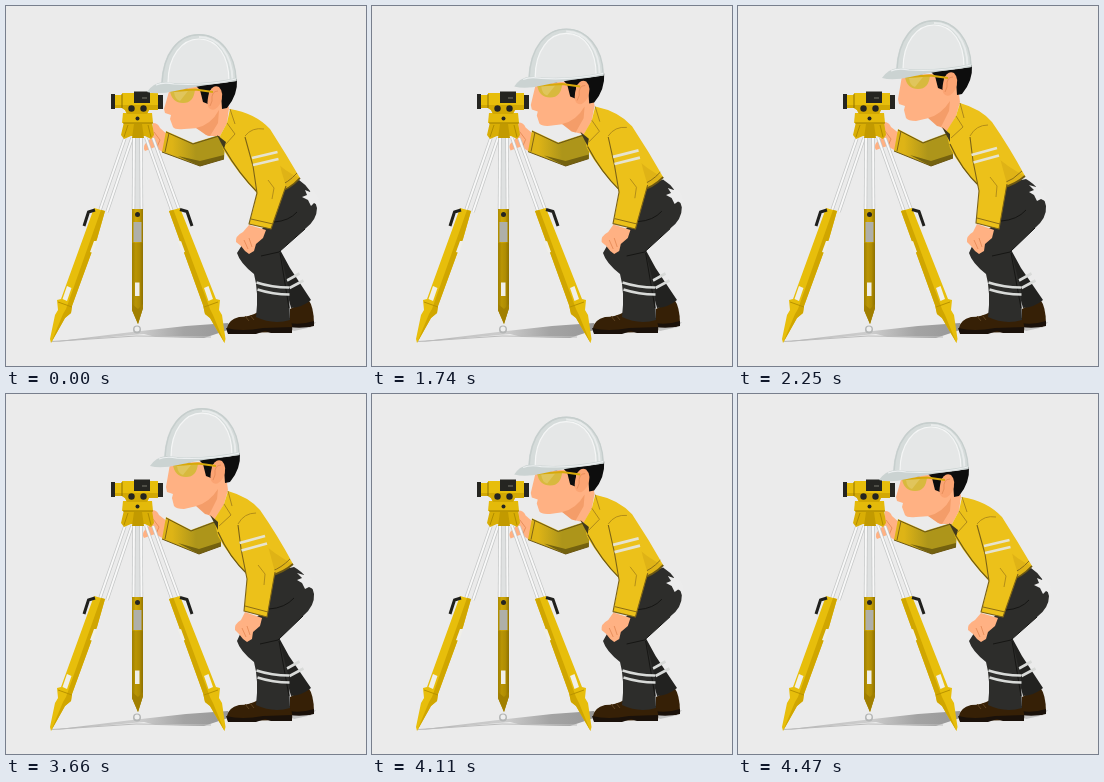
These frames come from a looping animation (360 by 360 pixels, 4500 ms). An HTML page with a canvas:

```html
<!DOCTYPE html>
<html lang="en">
<head>
<meta charset="utf-8">
<title>Surveyor</title>
<style>
html, body { margin: 0; width: 100%; height: 100%; overflow: hidden; background: #ebebeb; }
canvas { display: block; width: 360px; height: 360px; }
</style>
</head>
<body>
<canvas id="stage"></canvas>
<script>
const canvas = document.getElementById('stage');
const ctx = canvas.getContext('2d');
const scale = window.devicePixelRatio || 1;
canvas.width = canvas.height = 360 * scale;

const LOOP = 4500, STEP = 30;
const INK = '#252521', GOLD = '#e7be0b', DEEP = '#b99300', SHIRT = '#ecc11a', SEAM = '#6b5714';
const SKIN = '#ffb183', SKIN_DARK = '#e98f5c', PANTS = '#2d2d2b', SILVER = '#d8dad8';
let rise = 0;

// Blend two path strings that share the same commands.
function mix(low, high) {
  const ends = high.match(/-?\d+(\.\d+)?/g);
  let i = 0;
  return low.replace(/-?\d+(\.\d+)?/g, n => +n + (ends[i++] - n) * rise);
}

function fill(d, color) {
  ctx.fillStyle = color;
  ctx.fill(new Path2D(d));
}

function line(d, color, width = 1) {
  ctx.strokeStyle = color;
  ctx.lineWidth = width;
  ctx.stroke(new Path2D(d));
}

function dot(x, y, r, color) {
  ctx.fillStyle = color;
  ctx.beginPath();
  ctx.arc(x, y, r, 0, 2 * Math.PI);
  ctx.fill();
}

function fade(x0, x1, ...colors) {
  const g = ctx.createLinearGradient(x0, 0, x1, 0);
  colors.forEach((c, i) => g.addColorStop(i / (colors.length - 1), c));
  return g;
}

function pole(d) {
  line(d, '#c3c5c5', 3.4);
  line(d, '#f8f8f8', 2);
}

function drawShadow() {
  fill('M45 336 L126 326 L180 320 L222 317 L222 324 L198 332 L150 331 L138 328 L60 335Z',
    fade(45, 222, '#a8a8a8', '#c4c4c4', '#cdcdcd', '#a4a4a4', '#989898'));
  line('M46 335.5 L130 330 L205 331', '#bcbcbc');
  fill('M282 321 L310 316 L306 321 L288 325Z', '#c4c4c4');
}

function drawTripod() {
  fill('M128 132 H135 V204 H128Z', '#dfe1e1');
  ['M119 132 L94 204', 'M126 132 L101 206', 'M128 132 L127.5 204', 'M135 132 L135.5 204',
   'M140 132 L166 205', 'M147 132 L173 203'].forEach(pole);

  // left leg
  fill('M88 202 L99 205 L91 233 L85 248 L66 300 L65 307 L59 312 L45 337 L44 333 L49 309 L52 304 L51 294 L55 293Z', GOLD);
  fill('M99 205 L91 233 L85 248 L66 300 L65 307 L59 312 L45 337 L57 308 L60 303 L95 204Z', '#d0a600');
  fill('M88 235 L91 235 L87 247 L84 246Z', '#f0efe9');
  fill('M61 280 L65.5 282 L61 295 L56.5 293Z', '#f0efe9');
  line('M52 296 L66 301', DEEP);
  line('M89 204 L82.5 206 L78 220', '#20201d', 3);

  // middle leg
  fill('M126 203 H137 V302 L132 318 L126 304Z', fade(126, 137, '#ab8a00', '#cfa706', '#c39c04', '#957600'));
  fill('M126 237 H137 V302 L132 318 L126 304Z', 'rgba(120, 95, 0, 0.25)');
  fill('M126 298 L132 303 L137 298 V302 L132 318 L126 304Z', '#a17f00');
  fill('M127.5 216 H135.5 V236 H127.5Z', '#aeafa9');
  fill('M129 276.5 H133.5 V290 H129Z', '#f0efe9');
  dot(131.5, 208.5, 2.5, INK);
  dot(131, 323.5, 4, '#b4b6b6');
  dot(131, 323, 2.5, '#eeeeee');

  // right leg
  fill('M163 205 L174 202 L210 293 L214 294 L213 304 L216 309 L219.5 333 L218.5 337 L204 312 L199 308 L197 299Z', GOLD);
  fill('M163 205 L167.5 204 L204 303 L207 309 L218.5 337 L204 312 L199 308 L197 299Z', '#d0a600');
  fill('M172 236 L175 235 L179 246 L176 247Z', '#f0efe9');
  fill('M198 282 L202.5 280 L207 293 L202.5 295Z', '#f0efe9');
  line('M198 301 L212 296', DEEP);
  line('M174 203.5 L181 205.5 L186 220', '#20201d', 3);

  // head plate and level
  fill('M118 116 H146 L148 129 L145 133 L139 130 H125 L118 133 L115 129Z', '#d9ae05');
  fill('M128 118 H136 L138 132 H126Z', '#c29a00');
  fill('M117 107 H146 L147 117 H116Z', '#e4ba0a');
  line('M117 117 H147', '#a98700', 1.2);
  line('M122 119 L118 131 M142 119 L145 131', '#b18c00');
  dot(131.5, 112.5, 2, INK);
  fill('M108 89 H116 V87 H152 V104 H143 L141 108 H121 L119 104 L116 102 H108Z', GOLD);
  fill('M108 99 H152 V104 H143 L141 108 H121 L119 104 L116 102 H108Z', '#d2a803');
  fill('M105 88 H109 V103 H105Z', INK);
  line('M116 88 V102', '#8f7203');
  fill('M128 85.5 H144 V97 H128Z', INK);
  line('M136 92 H141', '#77766a');
  fill('M152 89 H157 V103 H152Z', INK);
  dot(125.5, 102.5, 3.2, INK);
  dot(137.5, 102.5, 3.2, INK);
}

function drawFarArm() {
  fill(mix('M147 117 Q152 117 154 122 L163 130 L158 147 L149 141 L139 145 Q136 140 141 136 L146 131Z',
           'M146 116 Q151 116 153 121 L162 128 L158 145 L149 140 L138 144 Q135 139 140 135 L145 130Z'), SKIN);
  line(mix('M148 126 L154 134 L151 141', 'M147 125 L153 133 L150 140'), SKIN_DARK);
  fill(mix('M160 125 L187 137 L213 129 L219 138 L218 153 L194 160 L156 146Z',
           'M160 123 L185 136 L209 127 L215 138 L215 152 L193 160 L156 145Z'),
    fade(166, 190, '#deb416', '#ad951a'));
  fill(mix('M172 150 L194 155 L218 149 L218 153 L194 160Z',
           'M172 149 L193 155 L215 148 L215 152 L193 160Z'), '#74620f');
  line(mix('M160 126 L187 138 L213 130 M156 146 L194 160 L218 153',
           'M160 124 L185 137 L209 128 M156 145 L193 160 L215 152'), SEAM);
  line(mix('M163 127 L159 146', 'M163 125 L159 145'), '#816416');
}

function drawLegs() {
  // far leg and boot
  fill('M284 303 L302 293 Q308 301 308 318 L304 321 L284 320Z', '#362006');
  fill('M283 317 Q296 319 308 315 V320 Q296 323 283 321Z', '#1a110a');
  fill(mix('M272 240 L284 262 L305 294 Q297 301 285 302 L273 255Z',
           'M271 240 L283 262 L305 294 Q297 301 285 302 L272 255Z'), '#222220');
  line('M281 274.5 L293.5 267.5 M283.5 282 L297.5 274.5', SILVER, 2.6);

  // near boot
  fill('M221 322 Q222 314 233 311 Q244 311 252 306 L284 312 Q287 320 286 326 L222 327Z', '#362006');
  fill('M220 322 Q236 326 257 322 L286 321 V327 H265 L259 325 L250 328 H222Z', '#1a110a');
  line('M239 310 L243 315 M244 309 L248 314', '#5e4320');

  // near leg
  fill(mix('M267 186 L293 174 Q307 183 311 202 Q311 214 299 223 L274 245 L283 284 L284 314 Q267 319 250 311 Q253 286 248 268 Q234 257 231 247 L238 236 L257 222Z',
           'M261 179 L288 173 Q304 182 308 200 Q309 212 297 222 L273 245 L283 284 L284 314 Q267 319 250 311 Q253 286 248 268 Q234 257 231 247 L236 236 L253 221Z'), PANTS);
  line(mix('M299 223 L273 246 L255 250 M274 247 L283 302 M268 216 Q283 215 291 206',
           'M297 222 L272 246 L254 250 M273 247 L283 302 M263 215 Q279 214 288 204'), '#161614');
  line('M250.5 276.5 Q266 281.5 283 281.5 M251.5 283.5 Q267 288.5 283.5 288.5', SILVER, 2.6);

  // cloth in the back pocket
  fill(mix('M296 191 L301 189 L299 184 L304 186 L306 182 L310 188 L312 191 L313.5 200 L308 197 L305 200 L302 194Z',
           'M291 186 L296 184 L291 179 L298 181 L300 178 L305 184 L307 188 L309 196 L303 193 L299 195 L296 189Z'), '#ececec');
}

function drawFace() {
  fill(mix('M164 82 L158 103 L159 107 L165 109 L164 113 L167 121 Q169 124 178 123 L193 122 L202 130 L214 130 L221 117 L223 102 L216 80Z',
           'M164 70 L160 93 L161 98 L167 100 L166 104 L168 112 Q170 115 178 115 L191 112 L200 119 L209 126 L218 110 L222 96 L218 66Z'), SKIN);
  fill(mix('M190 122 Q205 119 213 104 L212 117 L204 130 L200 129Z',
           'M190 112 Q203 109 212 95 L211 105 L203 121 L199 120Z'), '#f49d69');
}

function drawTorso() {
  fill(mix('M214 130 L221 117 L224 103 Q249 107 264 123 Q280 148 294 172 Q283 184 270 187 L253 189 Q232 168 217 143Z',
           'M208 126 L218 110 L222 97 Q243 103 254 116 Q272 142 287 170 Q278 178 264 182 L243 182 Q223 163 212 142Z'), SHIRT);
  fill(mix('M266 152 Q279 166 294 172 Q283 184 270 187 L266 180Z',
           'M253 146 Q269 161 287 170 Q278 178 264 182 L255 172Z'), '#dfb316');
  fill(mix('M211 129 L220 136 L218 143Z', 'M204 121 L212 128 L212 136Z'), '#40391d');
  line(mix('M221 117 L229 128 L219 139 M224 103 L229 118', 'M218 110 L225 121 L213 132 M222 97 L226 112'), '#ad881a');
  line(mix('M218 142 Q233 168 252 187', 'M212 138 Q223 163 242 181'), SEAM, 1.2);
  line(mix('M294 172 Q283 184 270 187', 'M287 170 Q278 178 264 182'), SEAM, 1.8);
  line(mix('M291 167 Q282 177 272 180', 'M284 165 Q275 174 266 177'), '#8c6d15');
}

function drawNearArm() {
  fill(mix('M243 219 L260 224 L257 232 L250 238 L248 245 L243 248 L239 245 L235 240 L230 236 Q229 230 237 226Z',
           'M239 218 L256 224 L254 232 L247 238 L246 245 L241 248 L237 245 L233 240 L229 236 Q228 230 235 226Z'), SKIN);
  line(mix('M238 234 L242 243 M243 232 L246 241', 'M236 234 L240 243 M241 232 L244 241'), SKIN_DARK);
  fill(mix('M239 130 Q246 121 258 123 Q269 132 272 150 Q275 166 280 180 L265 223 L243 218 Q248 203 251 187 L247 160Z',
           'M232 130 Q238 119 250 119 Q257 130 260 144 Q264 160 269 178 L261 223 L238 217 Q240 202 241 185 L235 155Z'), SHIRT);
  line(mix('M239 131 L247 160 L251 187 L243 218 L265 223 L280 180',
           'M232 131 L235 155 L241 185 L238 217 L261 223 L269 178'), '#7d6316', 1.1);
  line(mix('M239 130 Q246 121 258 123 M262 174 L268 182 L266 193',
           'M232 130 Q238 119 250 119 M252 171 L259 180 L258 191'), '#b48e18');
  line(mix('M245 213 L267 218', 'M239 212 L262 218'), '#8c6d15');
  line(mix('M246 152 L271.5 146 M247 159 L272.5 153',
           'M233.5 149 L259 142 M235.5 156.5 L261 149.5'), '#e6e3d0', 2.8);
}

function drawHead() {
  ctx.save();
  ctx.translate(3 * rise, -14 * rise);

  // hair and ear
  fill('M190 80 L231 73 Q232 89 221 102 L216 103 L215 87 Q208 78 203 86 L202 98 L197 96 L194 84Z', '#0d0d0d');
  fill('M203 88 Q206 78 213 81 Q219 87 214 98 Q208 107 203 102 Q200 98 203 88Z', '#fba473');
  line('M212 85 Q205 85 206 95 L204 100', SKIN_DARK);

  // glasses
  line('M171 83 L184 81', '#493321', 1.5);
  fill('M164 85 L189 83 Q188 97 177 97 Q166 97 164 85Z', '#d8b93e');
  fill('M168 86 L182 85 L174 95 Q169 94 168 86Z', '#e0c55c');
  line('M164 85 L189 83.5 L207 86', '#d7a90a', 2);

  // helmet
  fill('M155 79 C156 47 172 28 193 28 C215 28 230 48 230.5 75 Q190 82 155 79Z', '#d6dcdb');
  line('M156 78 C157 47 173 28.7 193 28.7 C214 28.7 229.5 48 230 74', '#c6cecd', 1.4);
  fill('M162 78 C162 50 176 33 193 33 C212 33 223 51 223 76 Q190 80 162 78Z', '#e5e7e7');
  line('M162 77 C162 50 176 33 193 33 C212 33 223 51 223 75', '#f5f6f6', 1.2);
  line('M226.5 74 C226 49 213 31 193 31', '#e9ecec', 2);
  fill('M141 86 Q147 77 157 76 Q191 80 230 72 L230.5 75 Q196 79 169 85 Q152 89 141 86Z', '#cbd3d2');
  line('M150 79 Q157 76 168 78 Q201 80 230 73', '#eceff0', 1.2);
  ctx.restore();
}

function ease(u) {
  return 0.5 - 0.5 * Math.cos(Math.PI * Math.min(1, Math.max(0, u)));
}

function draw(now) {
  const t = Math.floor((now % LOOP) / STEP) * STEP;
  rise = ease((t - 1350) / 900) - ease((t - 3630) / 840);
  ctx.setTransform(scale, 0, 0, scale, 0, 0);
  ctx.lineJoin = 'round';
  ctx.fillStyle = '#ebebeb';
  ctx.fillRect(0, 0, 360, 360);
  drawShadow();
  drawFarArm();
  drawLegs();
  drawFace();
  drawTorso();
  drawNearArm();
  drawTripod();
  drawHead();
}

const start = performance.now();
function frame() {
  draw(performance.now() - start);
  requestAnimationFrame(frame);
}
frame();
</script>
</body>
</html>
```
